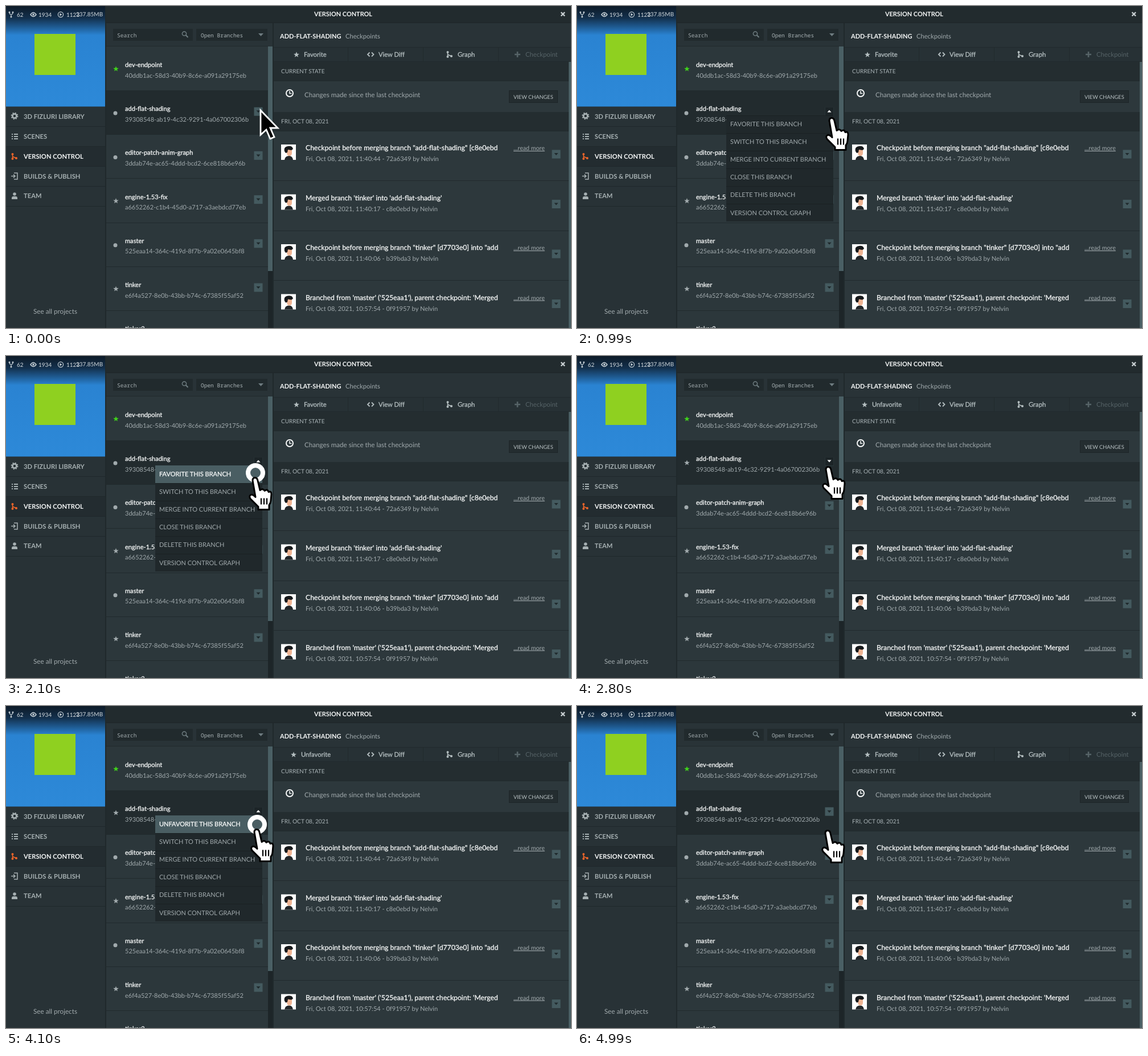
An HTML page for the animation above (5090 ms loop, 992 px wide and 565 px high).

```html
<!DOCTYPE html>
<html lang="en">
<head>
<meta charset="utf-8">
<title>Version control</title>
<style>
  html, body { margin: 0; height: 100%; overflow: hidden; background: #2b363a; }
  svg { display: block; width: 100vw; height: 100vh; }
  text { font-family: Lato, sans-serif; text-rendering: geometricPrecision; white-space: pre; }
  .mono { font-family: "Noto Sans Mono", monospace; }
</style>
</head>
<body>
<svg id="stage" viewBox="0 0 992 565"></svg>
<script>
const WHITE = '#f6f8f8', GREY = '#a1aaad', SIDE = '#a6b0b2', DARK = '#222b2e', LINE = '#212a2d';

// Drawing helpers; text y is the middle of the capitals
const rect = (x, y, w, h, fill, extra = '') =>
  `<rect x="${x}" y="${y}" width="${w}" height="${h}" fill="${fill}" ${extra}/>`;
const text = (s, x, y, size, fill, extra = '') =>
  `<text x="${x}" y="${y + 4}" font-size="${size}" fill="${fill}" ${extra}>${s}</text>`;
const medium = (s, x, y, size, fill = WHITE, extra = '') =>
  text(s, x, y, size, fill, `stroke="${fill}" stroke-width=".3" ${extra}`);
const bold = (s, x, y, size, fill = WHITE) => text(s, x, y, size, fill, 'font-weight="700"');
const dot = (x, y, r, fill, extra = '') => `<circle cx="${x}" cy="${y}" r="${r}" fill="${fill}" ${extra}/>`;
const path = (d, fill, extra = '') => `<path d="${d}" fill="${fill}" ${extra}/>`;
const line = (d, color, width = 1.5) => path(d, 'none', `stroke="${color}" stroke-width="${width}"`);
const group = (id, content) => `<g id="${id}">${content}</g>`;

function star(x, y, r, fill) {
  const points = Array.from({ length: 10 }, (_, i) => {
    const a = i * Math.PI / 5, q = i % 2 ? r * .42 : r;
    return `${(x + q * Math.sin(a)).toFixed(2)},${(y - q * Math.cos(a)).toFixed(2)}`;
  });
  return `<polygon points="${points.join(' ')}" fill="${fill}"/>`;
}
const fork = (x, y, c) =>
  line(`M${x - 3} ${y - 4}v8M${x - 3} ${y}L${x + 3} ${y + 3}`, c) +
  dot(x - 3, y - 4, 2, c) + dot(x - 3, y + 4, 2, c) + dot(x + 3.5, y + 3, 2, c);
const arrowDown = (x, y, fill) => path(`M${x - 3.5} ${y - 2}h7l-3.5 4z`, fill);
const dropButton = (x, y) => rect(x - 7.5, y - 7.5, 15, 15, '#445a5f') + arrowDown(x, y, '#1f292c');

function sidebar() {
  const items = ['3D FIZLURI LIBRARY', 'SCENES', 'VERSION CONTROL', 'BUILDS &amp; PUBLISH', 'TEAM'];
  let out = rect(0, 0, 175, 565, '#283236') + rect(0, 247, 175, 34, '#232c30');
  items.forEach((s, i) => {
    out += rect(0, 176 + i * 35, 175, 1, '#1f282b') + bold(s, 31, 194 + i * 34.85, 11.2, i == 2 ? WHITE : SIDE);
  });
  return out + rect(0, 351, 175, 1, '#1f282b') + rect(174, 0, 2, 565, '#20292c') +
    rect(0, 0, 174, 176.5, 'url(#sky)') + rect(50, 49, 72, 72, '#8fd020') +
    dot(15, 193, 3.6, 'none', `stroke="${SIDE}" stroke-width="2.6"`) +
    dot(15, 193, 5.4, 'none', `stroke="${SIDE}" stroke-width="2" stroke-dasharray="2.1 2.14"`) +
    line('M10 225h2m2 0h7M10 229h2m2 0h7M10 233h2m2 0h7', SIDE, 2) +
    fork(14.5, 264, '#f0652a') +
    line('M14 293h6v11h-6M9 298.5h7m-3-3l3 3l-3 3', SIDE) +
    dot(15, 330, 2.8, SIDE) + path('M10 339v-2q0-3 3-3h4q3 0 3 3v2z', SIDE) +
    text('See all projects', 48, 536, 11.7, GREY) +
    line('M6 11q0 4 3 4q3 0 3-4M9 15v4', '#c4ced4', 1.2) +
    dot(6, 11, 1.5, '#c4ced4') + dot(12, 11, 1.5, '#c4ced4') + dot(9, 19, 1.5, '#c4ced4') +
    text('62', 19, 15, 10, '#d3dade') +
    line('M43 15q5-7 10 0q-5 7-10 0z', '#c4ced4') + dot(48, 15, 1.8, '#c4ced4') +
    text('1934', 57, 15, 10, '#d3dade') +
    dot(96, 15, 4.6, 'none', 'stroke="#c4ced4" stroke-width="1.2"') + path('M94.5 12.5v5l4-2.5z', '#c4ced4') +
    text('1123', 106, 15, 10, '#d3dade') + text('237.85MB', 123, 14, 10, '#d3dade');
}

function branchList() {
  const branches = [
    ['dev-endpoint', '40ddb1ac-58d3-40b9-8c6e-a091a29175eb', 'star'],
    ['add-flat-shading', '39308548-ab19-4c32-9291-4a067002306b'],
    ['editor-patch-anim-graph', '3ddab74e-ac65-4ddd-bcd2-6ce818b6e96b', 'dot'],
    ['engine-1.53-fix', 'a6652262-c1b4-45d0-a717-a3aebdcd77eb', 'star'],
    ['master', '525eaa14-364c-419d-8f7b-9a02e0645bf8', 'dot'],
    ['tinker', 'e6f4a527-8e0b-43bb-b74c-67385f55af52', 'star'],
    ['tinker2', '', '']];
  let out = rect(176, 30, 293, 535, '#2c373b') + rect(176, 30, 293, 41, '#293337') +
    rect(188, 40, 140, 21, '#212a2d') + rect(334, 40, 125, 21, '#212a2d') +
    text('Search', 195, 51, 9.6, GREY, 'class="mono"') +
    text('Open Branches', 342, 51, 9.5, '#aab3b6', 'class="mono"') +
    dot(313, 48.5, 3.6, 'none', 'stroke="#6f7d81" stroke-width="1.5"') + line('M315.5 51l4 4', '#6f7d81', 2) +
    path('M443 48h9l-4.5 5z', '#6f7d81') + rect(176, 70, 284, 1, LINE) +
    rect(176, 148, 284, 77, DARK);
  branches.forEach(([name, id, mark], i) => {
    const y = 103 + i * 77.2;
    out += rect(176, Math.round(y + 45), 284, 1, LINE) + medium(name, 209, y, 11.1) + text(id, 209, y + 18.5, 11, GREY);
    if (mark == 'star') out += star(193, y + 7.5, 5, i ? GREY : '#3fd01c');
    if (mark == 'dot') out += dot(192, y + 8, 3.5, GREY);
    if (i && id) out += dropButton(443, y + 5);
  });
  return out + rect(460, 71, 8, 494, '#1d2528') + rect(460, 71, 8, 394, '#4a5f64') + rect(468, 30, 2, 535, '#20292c');
}

function checkpoints() {
  const rows = [
    ['Checkpoint before merging branch "add-flat-shading" [c8e0ebd', '11:40:44 - 72a6349', true],
    ["Merged branch 'tinker' into 'add-flat-shading'", '11:40:17 - c8e0ebd', false],
    ['Checkpoint before merging branch "tinker" [d7703e0] into "add-', '11:40:06 - b39bda3', true],
    ["Branched from 'master' ('525eaa1'), parent checkpoint: 'Merged", '10:57:54 - 0f91957', true]];
  let out = rect(470, 30, 522, 535, '#2d383c') + rect(470, 30, 522, 42, '#293337') +
    rect(470, 72, 522, 26, '#273135') + rect(470, 72, 522, 1, LINE) +
    rect(470, 98, 518, 34, '#242d30') + rect(470, 186, 518, 34, '#242d30') +
    rect(470, 97, 522, 1, LINE) + rect(470, 131, 518, 1, LINE) + rect(470, 219, 518, 1, LINE) +
    [600, 732, 864].map(x => rect(x, 73, 1, 24, LINE)).join('') +
    bold('ADD-FLAT-SHADING', 481, 53, 11) + text('Checkpoints', 596, 53, 11.2, GREY) +
    line('M638.5 81.5l-3.5 3.5l3.5 3.5M642 81.5l3.5 3.5l-3.5 3.5', '#b4bec0', 1.8) +
    medium('View Diff', 654, 85, 11.2, '#b4bec0') +
    fork(778.5, 85, '#b4bec0') + medium('Graph', 793, 85, 11.2, '#b4bec0') +
    line('M893 85h10M898 80v10', '#566367', 2.6) + text('Checkpoint', 912, 85, 11.3, '#566367') +
    text('CURRENT STATE', 483, 114, 10, '#a9b3b6') + text('FRI, OCT 08, 2021', 483, 202, 10.2, '#a9b3b6') +
    dot(498, 153, 6, 'none', `stroke="${WHITE}" stroke-width="2"`) + line('M498 149v4.5h3.5', WHITE) +
    text('Changes made since the last checkpoint', 524, 156, 11.65, GREY) +
    rect(883.5, 148.5, 85, 21, '#242d30', 'stroke="#1d2528"') + text('VIEW CHANGES', 891, 159, 9.25, '#bac3c5');
  rows.forEach(([title, info, more], i) => {
    const y = 249 + i * 87.5;
    out += rect(470, Math.round(y + 57), 518, 1, LINE) +
      `<use href="#avatar" x="483" y="${y - 6}"/>` +
      medium(title, 526, y, 12.2, WHITE, 'clip-path="url(#titleClip)"') +
      text(`Fri, Oct 08, 2021, ${info} by Nelvin`, 526, y + 19, 11.05, GREY) + dropButton(966, y + 11);
    if (more) out += text('...read more', 891, y, 10.65, GREY, 'text-decoration="underline"');
  });
  return out + rect(988, 98, 4, 467, '#4a5f64');
}

function menu() {
  const items = ['', 'SWITCH TO THIS BRANCH', 'MERGE INTO CURRENT BRANCH', 'CLOSE THIS BRANCH',
    'DELETE THIS BRANCH', 'VERSION CONTROL GRAPH'];
  return rect(262, 192, 188, 186, '#20282b') + items.map((s, i) =>
    rect(262, 192 + i * 31, 188, 1, '#1a2123') + text(s, 269, 207 + i * 31.1, 11, GREY)).join('') +
    group('itemHover', rect(262, 192, 188, 31, '#4a5e63')) + medium('', 269, 207, 11, GREY, 'id="itemLabel"');
}

const hand = path('M-4 5Q-4 0 0 0Q4 0 5 5L9 22Q14 18 17 23Q22 19 24 25Q29 23 29 29L28 40Q28 44 25 48V56H6V51' +
  'L-8 37Q-11 32-7 30Q-4 29 1 34Z', '#fff', 'stroke="#000" stroke-width="3" stroke-linejoin="round"') +
  line('M11 36v11M16 36v11M21 36v11', '#000', 2.2);

document.getElementById('stage').innerHTML = `<defs>
  <linearGradient id="sky" x1="0" y1="0" x2="0" y2="1">
    <stop offset="0" stop-color="#0d1a27"/><stop offset=".12" stop-color="#13304d"/>
    <stop offset=".29" stop-color="#2a83d2"/><stop offset="1" stop-color="#2d89d8"/>
  </linearGradient>
  <clipPath id="titleClip"><rect x="526" y="230" width="339" height="335"/></clipPath>
  <g id="avatar">${rect(0, 0, 26, 27, '#fff') + path('M6 27q1-7 8-7q6 0 7 7z', '#24282b') +
    path('M10 9h9v7q-1 4-4 4q-5 0-5-6z', '#f0b594') + path('M6 12q-2-8 6-9q8-1 9 5l-3 2l-6-1l-1 5l-3 1z', '#17191b')}</g>
  </defs>` +
  sidebar() + branchList() + checkpoints() +
  rect(176, 0, 816, 30, '#222b2e') + rect(176, 29, 816, 1, '#1d2528') +
  bold('VERSION CONTROL', 541, 14, 10.9) + line('M974.5 11l6.5 6.5M981 11l-6.5 6.5', '#c9d0d2', 2.4) +
  group('favTab', star(510, 85.5, 5.2, '#b4bec0') + medium('', 523, 85, 11.2, '#b4bec0', 'id="favLabel"')) +
  group('plainMark', dot(192, 188, 3.5, GREY)) + group('favMark', star(193, 187.5, 5, GREY)) +
  group('hotButton', rect(435.5, 177.5, 15, 15, '#1c2427') + group('caret', arrowDown(0, 0, '#fff'))) +
  group('menu', menu()) +
  group('pointer',
    group('ring', dot(0, 0, 13, 'none', 'stroke="#fff" stroke-width="8"')) +
    group('hand', `<g transform="translate(-1 8.5)">${hand}</g>`) +
    group('arrow', path('M0 0V43L10 34L17 50L24 47L17 31H30Z', '#000', 'stroke="#fff" stroke-width="2.8"')));

const el = id => document.getElementById(id);
const show = (id, on) => el(id).setAttribute('display', on ? 'inline' : 'none');
const within = (t, ...spans) => spans.some(([a, b]) => t >= a && t < b);

// Pointer stops: time, x, y
const stops = [[0, 447, 183], [300, 448, 188], [1000, 448, 188], [1400, 447, 185], [1700, 438, 205],
  [2400, 438, 205], [2800, 442, 186], [3100, 442, 186], [3300, 443, 187], [3600, 443, 187],
  [3700, 441, 204], [4100, 441, 208], [4700, 441, 208], [5000, 441, 210], [5100, 441, 210]];

function pointerAt(t) {
  const i = stops.findIndex((s, k) => k && t <= s[0]);
  const [a, b] = [stops[i - 1], stops[i]], k = (t - a[0]) / (b[0] - a[0]);
  return [a[1] + (b[1] - a[1]) * k, a[2] + (b[2] - a[2]) * k];
}

function draw(now) {
  const t = Math.floor((now % 5090 + 10) / 100) * 100;
  const open = within(t, [900, 2400], [3500, 4400]);
  const hover = within(t, [1700, 2400], [3700, 4400]);
  const favorite = within(t, [2500, 4500]);
  const arrow = within(t, [0, 100], [1200, 1600]);
  show('menu', open);
  show('itemHover', hover);
  el('itemLabel').textContent = (favorite ? 'UNFAVORITE' : 'FAVORITE') + ' THIS BRANCH';
  el('itemLabel').setAttribute('fill', hover ? WHITE : GREY);
  el('itemLabel').setAttribute('stroke', hover ? WHITE : 'none');
  show('hotButton', within(t, [100, 4500]));
  el('caret').setAttribute('transform', `translate(443 184.5) scale(1 ${open ? -1 : 1})`);
  el('favLabel').textContent = favorite ? 'Unfavorite' : 'Favorite';
  el('favTab').setAttribute('transform', `translate(${favorite ? -5 : 0})`);
  show('favMark', favorite);
  show('plainMark', !favorite);
  show('ring', within(t, [500, 900], [2100, 2400], [3300, 3600], [4100, 4400]));
  show('arrow', arrow);
  show('hand', !arrow);
  el('pointer').setAttribute('transform', `translate(${pointerAt(t)})`);
  requestAnimationFrame(draw);
}
draw(performance.now());
</script>
</body>
</html>
```
